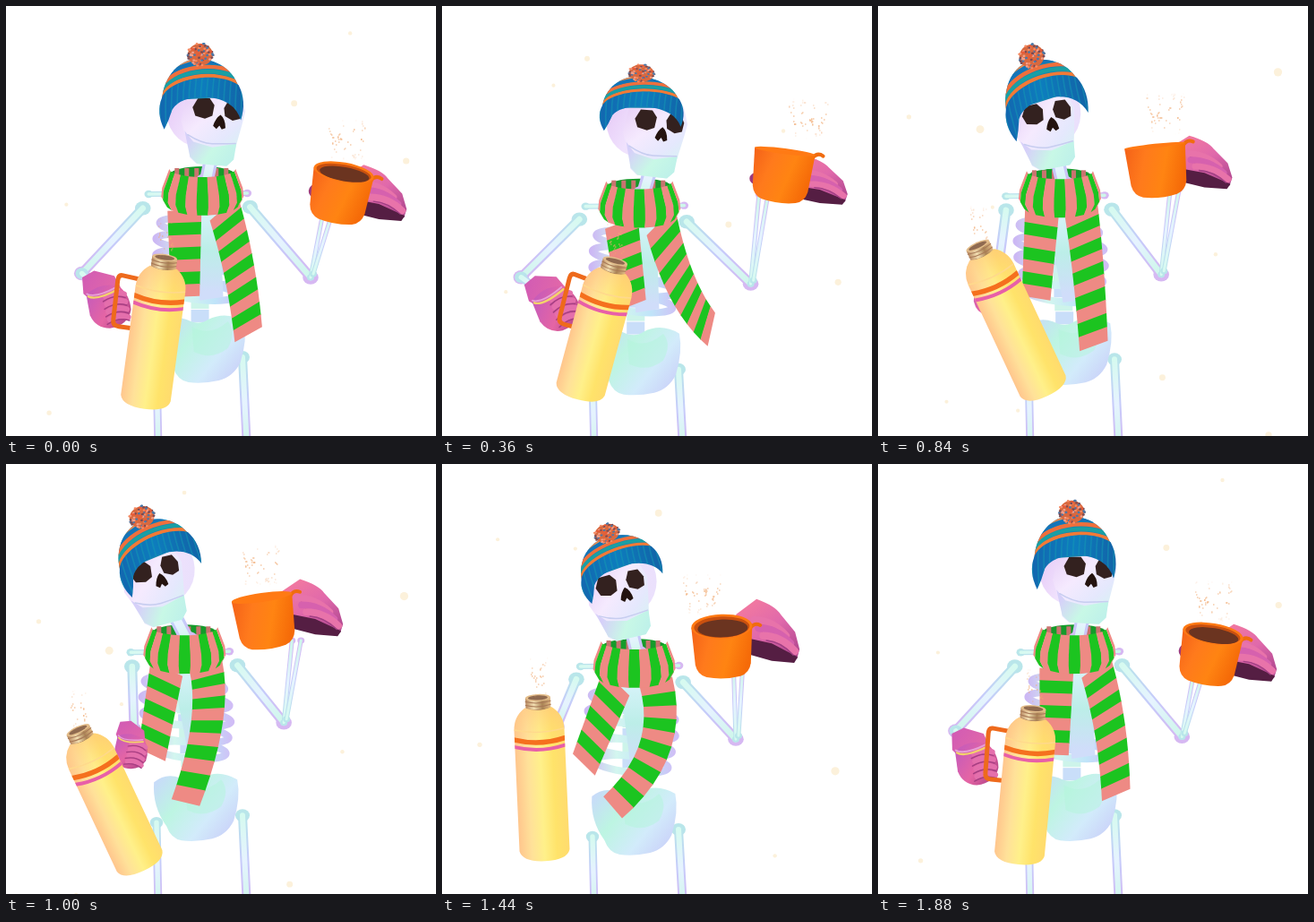
An HTML page with a canvas for the animation above (1.92 s loop, 480 by 480 pixels).

```html
<!DOCTYPE html>
<html lang="en">
<head>
<meta charset="utf-8">
<title>Warm drink dance</title>
<style>
html, body { margin: 0; width: 100%; height: 100%; overflow: hidden; background: #fff; }
canvas { display: block; width: 100vw; height: 100vh; }
</style>
</head>
<body>
<canvas id="stage" width="480" height="480"></canvas>
<script>
const g = document.getElementById('stage').getContext('2d');
const LOOP = 1920, STEP = 40, TAU = Math.PI * 2;
const mod = (a, n) => ((a % n) + n) % n;
const mix = (a, b, u) => a + (b - a) * u;
const lerp = (p, q, u) => [mix(p[0], q[0], u), mix(p[1], q[1], u)];
const off = (p, x, y) => [p[0] + x, p[1] + y];
function seeded(s) {
  return () => (s = (s * 16807) % 2147483647) / 2147483647;
}

// The dance: a side sway once per loop and a bob twice per loop.
// Each takes an amplitude and the time in ms at which it peaks.
function poseAt(t) {
  const sway = (amp, peak) => amp * Math.cos((t - peak) / LOOP * TAU);
  const bob = (amp, peak) => amp * Math.cos((t - peak) / LOOP * TAU * 2);
  const dip = bob(8, 480);
  const drift = sway(10, 60) + bob(3.7, 526);
  const roll = sway(12.5, 225) - 3;

  const scarf = [213 + drift, 214 + dip];
  const rim = [338 + sway(53, 185) + bob(6, 592), 170 + sway(20, 1771) + bob(10.7, 690)];
  const neck = [139 + sway(60, 218) + bob(9.4, 587), 274 + sway(5, 870) + bob(30, 179)];
  return {
    scarf, rim, neck, roll,
    hips: [216 + sway(4, 130), 390 + dip],
    hat: [203 + sway(27, 150) + bob(10.6, 597), 106 + dip * .83],
    nose: [216 + sway(36, 166) + bob(11.3, 597), 137.5 + dip],
    squash: .9 - bob(.13, 340),

    tailL: [183 + sway(30, 294), 330 + dip * .7],
    tailMid: [247 + sway(22, 207) + bob(4.6, 548), 305 + bob(12, 513)],
    tailR: [243 + sway(63, 326) + bob(10, 677), 374 + sway(10, 1250) + bob(6, 686)],
    slant: .3 + sway(.35, 360),

    shL: [149 + drift * .6, 233 + dip * .9],
    elL: [113 + sway(32, 1109), 298 + sway(5, 450)],
    handL: [121 + sway(12.5, 870) + bob(15, 188), 322 + sway(9, 261)],
    fist: .87 + sway(.13, 240),
    fistTurn: -sway(22, 330),
    shR: [268 + drift * .7, 234 + dip * 1.2],
    elR: [330 + sway(16, 130) + bob(4.6, 496), 304 + sway(7.3, 177) + bob(10, 598)],
    wrR: [341 + sway(20, 187), rim[1] + 48],
    handR: [rim[0] + 47 - sway(12, 185), rim[1] + 19 + sway(14, 368)],
    flat: .95 - sway(.13, 480),

    tilt: 1 + sway(9.5, 100),
    open: Math.max(2, 7.6 + sway(7, 1590)),
    steam: [rim[0] + sway(25, 470), rim[1] - 38],
    base: [151 + sway(28, 535) + bob(25.6, 771), 442.5 + sway(8, 1440) + bob(15, 164)],
    handle: .5 + sway(.5, 120),
    puff: off(neck, -2, -24)
  };
}

// ---- drawing helpers
const fade = (x0, y0, x1, y1, ...cs) => {
  const f = g.createLinearGradient(x0, y0, x1, y1);
  cs.forEach((c, i) => f.addColorStop(i / (cs.length - 1), c));
  return f;
};
function poly(pts, fill) {
  g.beginPath();
  pts.forEach(p => g.lineTo(p[0], p[1]));
  g.closePath();
  g.fillStyle = fill;
  g.fill();
}
function oval(x, y, rx, ry, fill) {
  g.beginPath();
  g.ellipse(x, y, rx, ry, 0, 0, TAU);
  g.fillStyle = fill;
  g.fill();
}
function shape(d, fill) {
  g.fillStyle = fill;
  g.fill(new Path2D(d));
}
function line(d, color, w) {
  g.lineCap = 'round';
  g.strokeStyle = color;
  g.lineWidth = w;
  g.stroke(new Path2D(d));
}
function clipped(d, draw) {
  g.save();
  g.clip(new Path2D(d));
  draw();
  g.restore();
}
function at(p, deg, draw, sx = 1, sy = 1) {
  g.save();
  g.translate(p[0], p[1]);
  g.rotate(deg * Math.PI / 180);
  g.scale(sx, sy);
  draw();
  g.restore();
}
function bone(a, b, w) {
  const edge = fade(...a, ...b, '#b9e6ea', '#c6cbfa', '#d6b8f2');
  const core = fade(...a, ...b, '#d6faf0', '#e6f3ff', '#cdf7ea');
  const seg = `M${a}L${b}`;
  [a, b].forEach(p => oval(p[0], p[1], w * .8, w * .7, edge));
  line(seg, edge, w);
  line(seg, core, w * .6);
}

// ---- falling flecks: nearer ones are larger and faster
function flecks(t) {
  const rnd = seeded(2024);
  for (let i = 0; i < 12; i++) {
    const near = rnd(), x = 20 + 440 * rnd();
    const age = mod(t - LOOP * (i + rnd()) / 12, LOOP), k = 1 - age * 6e-5;
    const r = 2 + near * 3;
    oval(240 + (x - 240) * k, mix(.3, .5, near) * age * k - r, r, r, '#fcf1db');
  }
}

function torso(neck, hips) {
  const mid = u => off(lerp(neck, hips, u), -3, 0);
  const [hx, hy] = hips;
  bone([168, hy + 18], [170, 495], 9);
  bone([264, hy + 10], [269, 495], 10);

  for (let i = 0; i < 9; i++) {
    const p = mid(.2 + i * .085);
    g.fillStyle = i % 2 ? '#c9def9' : '#cdf4ea';
    g.fillRect(p[0] - 10, p[1] - 7, 20, 14);
  }
  at(hips, 0, () => {
    shape('M-47 -27Q-34 -38 -18 -32Q-4 -25 6 -32Q26 -42 46 -30Q50 -10 42 16Q34 32 18 36Q0 40 -16 38Q-28 36 -33 22Q-49 0 -47 -27Z',
      fade(-45, -30, 40, 38, '#c8dafa', '#bdf5e2', '#d2ebfb', '#c8cdf8'));
    shape('M-12 -24Q8 -12 28 -30Q38 -18 28 0Q10 14 -10 4Z', 'rgba(180,245,220,.5)');
  });
  for (let i = 0; i < 5; i++) {
    const [x, y] = mid(.23 + i * .103);
    g.beginPath();
    g.ellipse(x, y, 45 + 5 * Math.sin(i), 9, .1, 0, TAU);
    g.strokeStyle = fade(x - 50, y, x + 50, y, '#ccb8f4', '#d3f6ef', '#c0e4f9', '#d0bdf6');
    g.lineWidth = 8;
    g.stroke();
  }
  const top = mid(.12), low = mid(.64);
  poly([off(top, -13, 0), off(top, 22, 0), off(low, 26, 6), off(low, 0, 10)],
    fade(...top, ...low, '#d8f3fa', '#bceee8', '#d0ddfa'));
}

// ---- scarf
const GREEN = '#1cc420', PINK = '#ee8a84';
function ribbon(a, m, b, n, slant) {
  const c = [2 * m[0] - (a[0] + b[0]) / 2, 2 * m[1] - (a[1] + b[1]) / 2];
  const rail = u => {
    const q0 = lerp(a, c, u), q1 = lerp(c, b, u), p = lerp(q0, q1, u);
    const dx = q1[0] - q0[0], dy = q1[1] - q0[1];
    const k = mix(19, 16, u) / Math.hypot(dx, dy), s = k * slant;
    return [off(p, -dy * k + dx * s, dx * k + dy * s),
            off(p, dy * k - dx * s, -dx * k - dy * s)];
  };
  for (let i = 0; i < n; i++) {
    const [p, q] = rail(i / n), [r, s] = rail(Math.min(1, (i + 1.06) / n));
    poly([p, q, s, r], (n - i) % 2 ? PINK : GREEN);
  }
}
function collarBack(p) {
  at(p, 0, () => {
    oval(0, -18, 36, 9, '#159a2a');
    for (let i = 0; i < 6; i++) {
      g.fillStyle = '#c9736f';
      g.fillRect(-31 + i * 11, -25, 5, 10);
    }
  });
}
function collar(p) {
  const n = 11;
  const edge = u => {
    const a = (u - .5) * Math.PI, s = Math.sin(a), c = Math.cos(a);
    return [[37 * s, -24 + 9 * c], [45 * s, -3 + 10 * c], [46 * s, 7 + 12 * c], [41 * s, 15 + 13 * c]];
  };
  at(p, 0, () => {
    for (let i = 0; i < n; i++)
      poly([...edge(i / n), ...edge((i + 1.04) / n).reverse()], i % 2 ? GREEN : PINK);
  });
}

// ---- head
function skull(hat, nose, deg) {
  at(hat, deg, () => oval(0, 18, 38, 40, fade(-38, 0, 38, 30, '#e6c9f6', '#f0e2fd', '#eae0fc')));
  at(nose, deg, () => {
    shape('M-40 -28L-43 4L-37 18L-32 26L-29 43L-21 49L12 48L18 42L22 18L25 0L27 -15L20 -34Z',
      fade(-40, -20, 25, 40, '#ead4f8', '#f5eafe', '#e5e8fd', '#d3f5f0'));
    shape('M-38 14L-27 25L-5 29L21 22L20 40L13 48L-20 49L-29 42Z',
      fade(-30, 20, 18, 48, '#d6d0f9', '#c8f8e6', '#bdf0ea'));
    line('M-34 18Q-18 26 -6 25T20 22', '#c7cdf0', 1.5);
    shape('M-32 -13L-27 -24L-14 -25L-8 -18L-9 -6L-17 -2L-28 -4Z', '#33211f');
    shape('M3 -16L7 -25L18 -25L23 -16L22 -6L14 -3L5 -7Z', '#33211f');
    shape('M0 -8Q6 -4 7 6L3 8L0 4L-3 8L-7 5Q-5 -4 0 -8Z', '#24130f');
  });
}
function beanie(p, deg, squash) {
  const dome = 'M-45 8C-44 -22 -25 -40 -7 -41C18 -41 38 -28 43 0Z';
  const brim = 'M-45 5C-38 -17 15 -29 40 -13Q50 5 44 27Q36 3 4 2Q-25 3 -33 18Q-36 30 -41 41Q-51 22 -45 5Z';
  at(p, deg, () => {
    const rnd = seeded(91);
    shape(dome, '#1685b0');
    clipped(dome, () => ['#f27a36', '#1a9fa4', '#ef6f3c', '#1574b8', '#e98a55'].forEach((c, i) => {
      const y = -i * 5.2;
      line(`M-48 ${6 + y}C-38 ${-20 + y} 15 ${-32 + y} 46 ${-12 + y}`, c, 4.5);
    }));
    shape(brim, fade(-45, 0, 45, 0, '#1268b0', '#0d7dbd', '#1264a8'));
    clipped(brim, () => {
      for (let x = -46; x < 46; x += 6.5)
        line(`M${x} -24Q${x - 3} 5 ${x + 1} 42`, 'rgba(20,155,180,.5)', 1.6);
    });
    oval(-4, -46, 14, 12.5, '#d9693f');
    for (let i = 0; i < 75; i++) {
      const a = rnd() * TAU, r = 14.5 * Math.sqrt(rnd());
      oval(-4 + Math.cos(a) * r, -46 + Math.sin(a) * r * .9, 1.5, 1.2,
        ['#f58a62', '#e85b37', '#4a78a8', '#f2a08c', '#784b55'][i % 5]);
    }
  }, 1, squash);
}

// ---- gloves
function fist(p, deg, s) {
  at(p, deg, () => {
    shape('M-25 -31L-10 -36L12 -26L18 -8L-16 2L-27 -12Z', fade(-25, -30, 15, 0, '#d25cb4', '#e56aa6'));
    shape('M-24 -10Q-8 -22 14 -14Q26 -2 24 16Q18 33 -4 33Q-20 30 -24 14Z',
      fade(-24, -10, 24, 30, '#c55bbb', '#e565a4', '#a93e83'));
    for (let y = -4; y < 28; y += 9) {
      line(`M-2 ${y}Q8 ${y - 5} 19 ${y + 1}`, '#e46fac', 7);
      line(`M-6 ${y + 5}Q8 ${y - 1} 20 ${y + 5}`, '#a63f83', 1.6);
    }
    line('M-22 -8Q-14 -1 14 -10', '#f3d36b', 2.5);
    line('M-23 -11Q-14 -4 13 -13', '#e8a0d8', 2);
  }, s, s);
}
function grip(p, flat) {
  at(p, 0, () => {
    line('M-68 -3L-20 0', '#9c3a7c', 17);
    shape('M-38 -18L-15 -34Q6 -27 12 -18L28 0L33 18L30 28L5 28L-28 20Z',
      fade(-20, -34, 20, 28, '#f279a0', '#e069ab', '#b14890'));
    shape('M-28 6L2 12L31 26L27 32L2 30L-28 22Z', '#551e43');
    for (let i = 0; i < 3; i++) {
      const x = i * 5 - 6, y = i * 8;
      line(`M${x - 12} ${y - 12}Q${x + 8} ${y - 12} ${x + 24} ${y + 4}`, i % 2 ? '#d661ae' : '#e873aa', 8);
      line(`M${x - 8} ${y - 7}Q${x + 8} ${y - 6} ${x + 22} ${y + 8}`, '#a23f84', 1.4);
    }
  }, 1, flat);
}

// ---- cup and flask
function cup(p, deg, open) {
  at(p, deg, () => {
    line('M31 4Q36 -4 43 0', '#f06c10', 4);
    shape('M-34 0L-31 42Q-29 53 -19 56Q0 60 19 56Q29 53 31 42L34 0Z',
      fade(-34, 0, 34, 20, '#f46218', '#ff7a1c', '#ff8412', '#f56a08'));
    oval(0, 0, 34, open, '#ff7a14');
    if (open > 6) {
      oval(0, .5, 31, open - 2, '#c9500f');
      oval(1, 2, 28, open * .72, '#6b3420');
    }
  });
}
function alongFlask(neck, base, draw) {
  const dx = base[0] - neck[0], dy = base[1] - neck[1];
  at(neck, Math.atan2(-dx, dy) * 180 / Math.PI, () => draw(Math.hypot(dx, dy)));
}
function handle(out) {
  const x = -12 - 38 * out;
  g.lineJoin = 'round';
  line(`M-20 28L${x + 4} 26Q${x} 26 ${x} 32L${x + 1} 77Q${x + 1} 83 ${x + 8} 83L-22 83`, '#ee6a1c', 5);
}
function flask(len) {
  g.fillStyle = fade(-14, 0, 14, 0, '#b98a62', '#f3dfb2', '#a98355', '#e0b884');
  g.fillRect(-14, 0, 28, 16);
  for (let y = 4; y < 14; y += 4) line(`M-14 ${y}Q0 ${y + 4} 14 ${y}`, '#a87957', 1);
  oval(0, 0, 14, 4, '#e3bd8b');
  oval(0, 0, 11, 2.6, '#8f6a50');
  const b = len - 12;
  const body = `M-15 11Q0 17 15 11Q28 20 28 36L28 ${b}Q25 ${len} 0 ${len}Q-25 ${len} -28 ${b}L-28 36Q-28 20 -15 11Z`;
  shape(body, fade(-28, 0, 28, 0, '#ffc68d', '#ffe199', '#fff08a', '#ffe36a', '#ffdb6e'));
  clipped(body, () => {
    g.fillStyle = fade(0, 12, 0, 52, 'rgba(255,190,125,.5)', 'rgba(255,205,130,0)');
    g.fillRect(-28, 8, 56, 44);
    line('M-28 35Q0 42 28 35', '#ffd98c', 1.5);
    line('M-28 46Q0 54 28 46', '#f5701e', 5.5);
    line('M-28 54Q0 62 28 54', '#e85fa8', 4);
  });
}
function vapour(p, lanes, t, seed) {
  const rnd = seeded(seed);
  for (let i = 0; i < lanes * 16; i++) {
    const lane = (i % lanes - (lanes - 1) / 2) * 11;
    const rise = mod(rnd() + t / LOOP * 2, 1);
    const x = p[0] + lane + Math.sin(rise * 6 + i % lanes) * 3 + rnd() * 5;
    g.fillStyle = `rgba(240,170,115,${.5 * Math.sin(rise * Math.PI)})`;
    g.fillRect(Math.round(x), Math.round(p[1] + 24 - rise * 46), 1.5, 2);
  }
}

function frame(t) {
  const q = poseAt(t);
  g.fillStyle = '#fff';
  g.fillRect(0, 0, 480, 480);
  flecks(t);
  torso(q.scarf, q.hips);

  bone(off(q.scarf, -60, 4), off(q.scarf, 50, 3), 6);
  bone(q.shL, q.elL, 11);
  bone(q.elL, lerp(q.elL, q.handL, .6), 9);
  bone(q.shR, q.elR, 11);
  bone(q.elR, off(q.wrR, -4, 0), 5);
  bone(off(q.elR, 3, -4), off(q.wrR, 6, 0), 5);

  const startL = off(q.scarf, -20, 22);
  ribbon(startL, lerp(startL, q.tailL, .5), q.tailL, 7, q.slant - .4);
  ribbon(off(q.scarf, 24, 20), q.tailMid, q.tailR, 11, q.slant);
  collarBack(q.scarf);
  bone(lerp(q.scarf, q.nose, .62), off(q.scarf, 4, -8), 16);
  collar(q.scarf);
  skull(q.hat, q.nose, q.roll);
  beanie(q.hat, q.roll - 4, q.squash);

  grip(q.handR, q.flat);
  cup(q.rim, q.tilt, q.open);
  vapour(q.steam, 4, t, 17);

  fist(q.handL, q.fistTurn, q.fist);
  alongFlask(q.neck, q.base, len => {
    handle(q.handle);
    flask(len);
  });
  vapour(q.puff, 2, t, 53);
}

function tick() {
  frame(Math.floor(performance.now() / STEP) * STEP % LOOP);
  requestAnimationFrame(tick);
}
tick();
</script>
</body>
</html>
```
